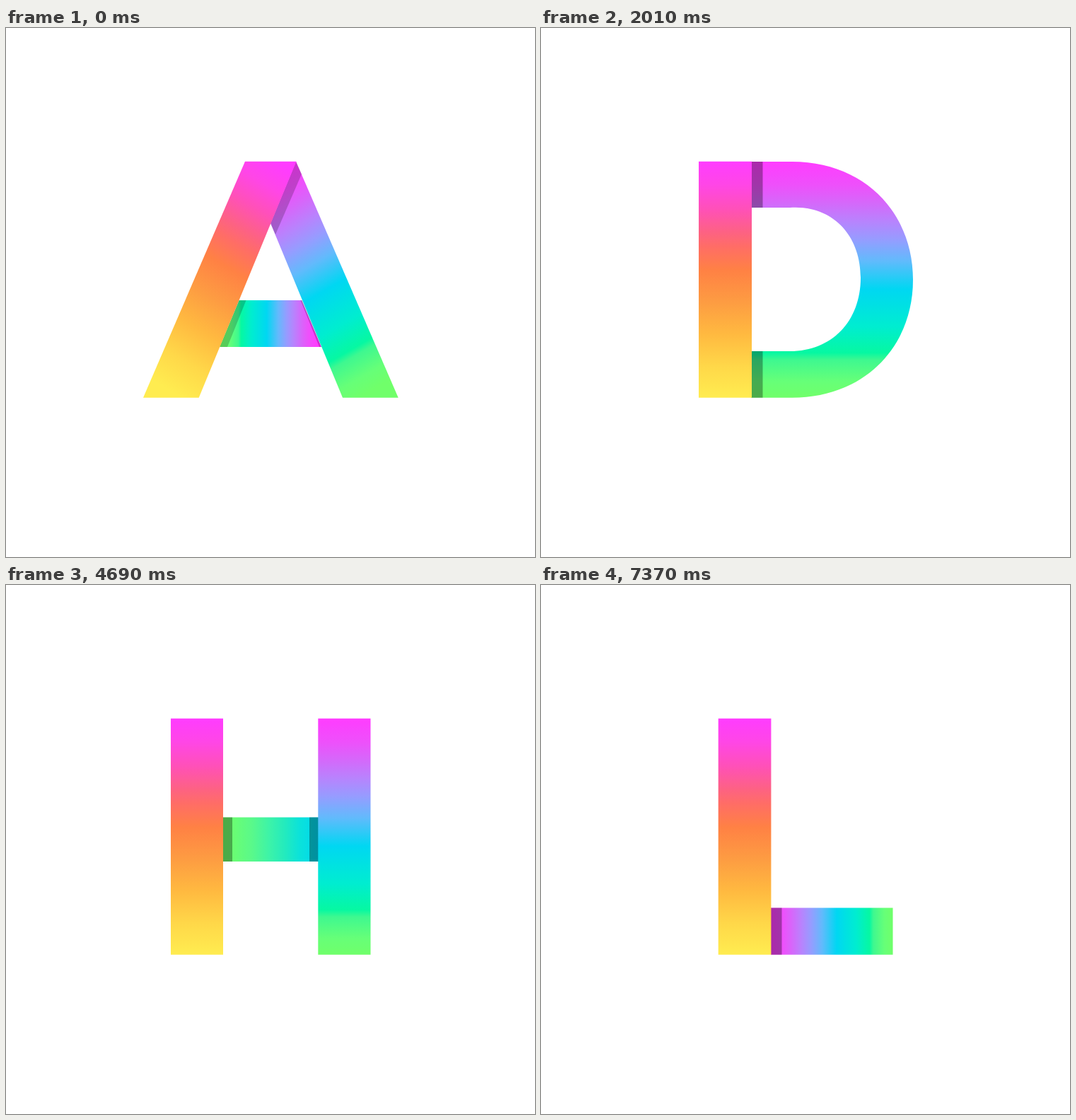
Write an HTML page that moves like this. It is 748 px wide and 748 px high and loops after 8 s.

```html
<!DOCTYPE html>
<html lang="en">
<head>
<meta charset="utf-8">
<title>Folded ribbon alphabet</title>
<style>
  html, body { margin: 0; width: 100%; height: 100%; overflow: hidden; background: #fff; }
  #stage { position: relative; width: 748px; height: 748px; }
  .letter { position: absolute; inset: 0; width: 748px; height: 748px; display: none; }
  .arc {
    background: conic-gradient(from 131deg at 393px 354px,
      #54fe7a 0deg, #38f98c 13deg, #00faa2 21deg, #08f6b0 30deg, #02efcc 49deg,
      #00e5e0 66deg, #00d7f2 81deg, #4cc4f6 91deg, #80aaf9 99deg, #a593ff 108deg,
      #cc74fc 118deg, #e65cfb 128deg, #ff3cff 139deg, #ff44e8 150deg, #ff4bc0 160deg,
      #fd5a88 174deg, #ff6c60 196deg, #ff7a58 206deg, #ffa64c 229deg, #ffcc48 248deg,
      #fee94c 265deg, #f0ff52 283deg, #f0ff52 300deg, #70ff6a 300deg);
  }
</style>
</head>
<body>
<div id="stage"></div>
<script>
const STEP = 670, LOOP = 8000;
const TOP = 188.7, BASE = 522.7;

// Colour ramps as [offset, colour]; both begin at the magenta fold.
const warm = [[0, '#ff3cff'], [.1, '#ff46e6'], [.2, '#ff50b9'], [.3, '#fd6283'], [.36, '#ff6d66'],
  [.46, '#ff8144'], [.6, '#fd9d42'], [.73, '#ffb940'], [.87, '#ffd849'], [1, '#ffec50']];
const cool = [[0, '#ff3cff'], [.1, '#ee50fb'], [.17, '#d766fa'], [.25, '#b982fd'], [.33, '#969cff'],
  [.42, '#62bafc'], [.54, '#00d7f2'], [.7, '#00edd0'], [.81, '#06f8a2'], [.84, '#3ef890'],
  [.93, '#66ff78'], [1, '#70ff6a']];
const bridge = [[0, '#70ff6a'], [.28, '#5af98a'], [.47, '#3df3a8'], [.65, '#22eabf'],
  [.8, '#0be2da'], [1, '#00d7ee']];
const full = [...warm.map(([o, c]) => [.5 - o / 2, c]).reverse(),
  ...cool.map(([o, c]) => [.5 + o / 2, c])];

let gradients = 0;
const rect = (x1, y1, x2, y2) => `M${x1},${y1}H${x2}V${y2}H${x1}Z`;
const shade = (d, alpha = .33) => `<path d="${d}" fill="#000" fill-opacity="${alpha}"/>`;

// A path filled along the line x1,y1 -> x2,y2.
function ribbon(d, ramp, [x1, y1, x2, y2]) {
  const id = 'g' + gradients++;
  const stops = ramp.map(([o, c]) => `<stop offset="${o}" stop-color="${c}"/>`).join('');
  return `<linearGradient id="${id}" gradientUnits="userSpaceOnUse" x1="${x1}" y1="${y1}" x2="${x2}" y2="${y2}">` +
    `${stops}</linearGradient><path d="${d}" fill="url(#${id})" fill-rule="evenodd"/>`;
}

const down = [0, TOP, 0, BASE];
const stem = (x1, x2, ramp = warm) => ribbon(rect(x1, TOP, x2, BASE), ramp, down);
const arm = (x1, y1, x2, y2, fold) =>
  ribbon(rect(x1, y1, x2, y2), cool, [x1, 0, x2, 0]) + shade(rect(x1, y1, x1 + fold, y2));
const svg = (...parts) =>
  `<svg class="letter" viewBox="0 0 748 748">${parts.join('')}</svg>`;
const arc = d => `<div class="letter arc" style="clip-path:path('${d}')"></div>`;

const letters = [
  // A
  svg(
    ribbon('M329.5,385H418L446,451H302Z', cool, [441, 0, 307, 0]),
    shade('M329.5,385H339.5L313,451H302Z', .2),
    shade('M416.5,385H419L446,451H443Z', .2),
    ribbon(`M410,${TOP}L554.7,${BASE}H476L374,276Z`, cool, [390, 195, 559, 488]),
    shade(`M410,${TOP}L418,206.5L381,292L374,276Z`, .2),
    ribbon(`M338,${TOP}H410.5L272.7,${BASE}H194Z`, warm, [392, 195, 214, 502])),
  // B
  svg(
    ribbon('M312,188.7H396C457,188.7 490,219 490,270C490,309 469,333 443,345C483,356 511,383 511,430' +
      'C511,490 465,522.7 392,522.7H312ZM312,251V324H377C403,324 417,312 417,287C417,263 403,251 378,251Z' +
      'M312,384V461H393C421,461 437,448 437,423C437,398 420,384 391,384Z', cool, down),
    shade(rect(312, TOP, 327, 251)), shade(rect(312, 324, 327, 384)), shade(rect(312, 461, 327, BASE)),
    stem(238, 312.5)),
  // C
  arc('M530,244C498,207 452,181 392,181C290,181 217,257 217,355C217,453 290,527 393,527' +
    'C455,527 497,499 528.5,463L481,413.5C456,442 427,457 393,457C335,457 294,411 294,354' +
    'C294,297 337,252 396,252C430,252 461,269 484.5,296Z'),
  // D
  svg(
    ribbon('M297,189H355C458,189 526,262 526,356C526,450 458,522.7 355,522.7H297V457H352' +
      'C411,457 452,415 452,353C452,293 412,250 352,254H297Z', cool, down),
    shade(rect(297, 189, 313.5, 254)), shade(rect(297, 457, 313.5, BASE)),
    stem(223, 298)),
  // E
  svg(
    arm(325, TOP, 496, 254, 15), arm(325, 324.5, 479, 387.5, 11), arm(325, 457, 498, BASE, 15),
    stem(250.5, 325)),
  // F
  svg(
    arm(328, TOP, 494.3, 255, 16), arm(328, 324.5, 477.3, 387.5, 11),
    stem(253.7, 328.4)),
  // G
  arc('M520,235C487,202 449,181 395,181C293,181 218,259 218,355C218,455 291,527 397,527' +
    'C455,527 500,504 530,476V338H392V402H458V442C442,453 422,459 399,459C340,459 296,416 296,354' +
    'C296,297 341,251 395,251C432,251 453,263 474,290Z'),
  // H
  svg(
    ribbon(rect(306, 328.5, 442, 391), bridge, [311, 0, 441, 0]),
    shade(rect(306, 328.5, 320, 391)), shade(rect(429, 328.5, 442, 391)),
    stem(233, 307), stem(441.3, 515.5, cool)),
  // I
  svg(stem(337, 411.5, full)),
  // J
  svg(
    ribbon('M407,252V408C407,440 391,459 366,459C343,459 323,449 305,426L266.5,479.5' +
      'C292,506 328,525 370,525C437,525 482.7,484 482.7,416V252Z', cool, [478, 260, 275, 515]),
    shade(rect(407, 252, 482.7, 265)),
    ribbon(rect(308, TOP, 482.7, 253), warm, [482.7, 0, 308, 0])),
  // K
  svg(
    ribbon(`M422,${TOP}H512L378,333L521,${BASE}H431L326,386L301,411V322Z`, cool, down),
    shade('M301,322L317,304.5V395.5L301,411Z'),
    stem(227, 302)),
  // L
  svg(arm(325, 456.5, 497.5, BASE, 15.5), stem(250.7, 325.4))
];

const stage = document.getElementById('stage');
stage.innerHTML = letters.join('');
const nodes = [...stage.children];

function render(time) {
  const current = Math.floor((time % LOOP) / STEP);
  nodes.forEach((node, i) => { node.style.display = i === current ? 'block' : 'none'; });
}

function tick() {
  render(performance.now());
  requestAnimationFrame(tick);
}
tick();
</script>
</body>
</html>
```
